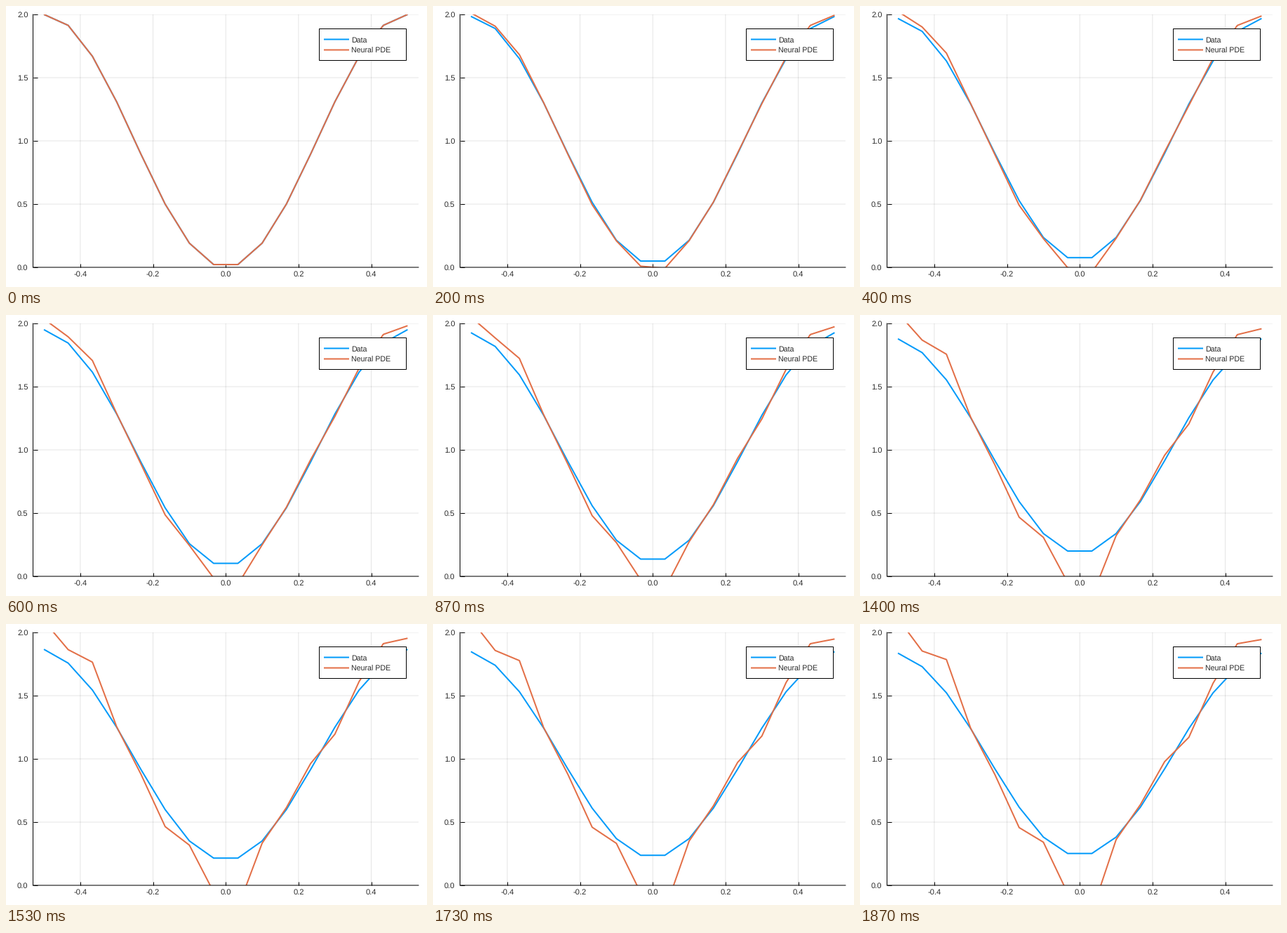
Recreate the animation shown at these times as a matplotlib script. Size 600 by 400 pixels, loop 1940 ms.

```python
import numpy as np
import matplotlib.pyplot as plt
from matplotlib.animation import FuncAnimation
from matplotlib.patches import Rectangle

W, H, DPI = 600, 400, 100
LOOP_MS, TICK_MS = 1940, 10
STEPS, STEPS_PER_S = 29, 15
PX = 72 / DPI  # one pixel in points
BLUE, ORANGE = "#009afa", "#e36f47"
INK = "#2b2b2b"

plt.rcParams.update({
    "font.family": "Liberation Sans",
    "font.size": 8,
    "axes.unicode_minus": False,
    "text.hinting": "none",
    "lines.solid_capstyle": "butt",
    "path.snap": False,
})

# Diffusion on 16 points with closed ends, solved by eigenmodes
N = 16
RATE = 0.0554
x = np.linspace(-0.5, 0.5, N)
start = 1 - np.cos(2 * np.pi * x)
lap = np.diag([1.0] + [2.0] * (N - 2) + [1.0])
lap -= np.eye(N, k=1) + np.eye(N, k=-1)
decay, modes = np.linalg.eigh(lap)
weights = modes.T @ start

# Learned model: drift of each point per step, slightly bent for some
drift = np.array([3.95, -2.16, 4.16, -2.38, -0.7, -1.55, 6.2, -4.4,
                  -10.1, 6.6, 5.2, 2.95, -4.95, -2.5, -0.1, -2.0]) * 1e-3
bend = np.zeros(N)
bend[6:11] = np.array([-30, 50, 65, -18, -10]) * 1e-6


def diffused(step):
    return modes @ (weights * np.exp(-RATE * step * decay))


def learned(step):
    return start + drift * step + bend * step ** 2


fig = plt.figure(figsize=(W / DPI, H / DPI), dpi=DPI, facecolor="white")

ax = fig.add_axes([38.5 / W, 28 / H, 549.4 / W, 360 / H])
ax.set(xlim=(-0.53, 0.53), ylim=(0, 2),
       xticks=[-0.4, -0.2, 0, 0.2, 0.4], yticks=[0, 0.5, 1, 1.5, 2])
ax.xaxis.set_major_formatter("{x:.1f}")
ax.yaxis.set_major_formatter("{x:.1f}")
ax.set_axisbelow(True)
ax.grid(color="black", alpha=0.1, linewidth=PX)
ax.tick_params(direction="in", length=5.5 * PX, width=PX, labelcolor=INK)
ax.tick_params(axis="x", pad=5 * PX)
ax.tick_params(axis="y", pad=7 * PX)
for side, spine in ax.spines.items():
    spine.set_linewidth(PX)
    spine.set_visible(side in ("left", "bottom"))

data_line, = ax.plot(x, start, color=BLUE, lw=2 * PX)
model_line, = ax.plot(x, start, color=ORANGE, lw=2 * PX)

# Legend on a pixel-sized overlay
key = fig.add_axes([0, 0, 1, 1])
key.set(xlim=(0, W), ylim=(H, 0))
key.axis("off")
key.add_patch(Rectangle((446.5, 32.5), 124, 45, facecolor="white",
                        edgecolor="black", linewidth=PX))
for y, color, label in [(47.5, BLUE, "Data"), (62.5, ORANGE, "Neural PDE")]:
    key.plot([453, 489], [y, y], color=color, lw=2 * PX)
    key.text(492.5, y + 4.5, label, va="baseline", size=7.7, color=INK)


def update(tick):
    # Steps change on the nearest 10 ms mark; the last one is held
    ms = tick * TICK_MS + TICK_MS // 2
    step = min(ms * STEPS_PER_S // 1000, STEPS - 1)
    data_line.set_ydata(diffused(step))
    model_line.set_ydata(learned(step))
    return data_line, model_line


anim = FuncAnimation(fig, update, frames=LOOP_MS // TICK_MS, interval=TICK_MS,
                     repeat=True, repeat_delay=0, blit=False)
plt.show()
```
